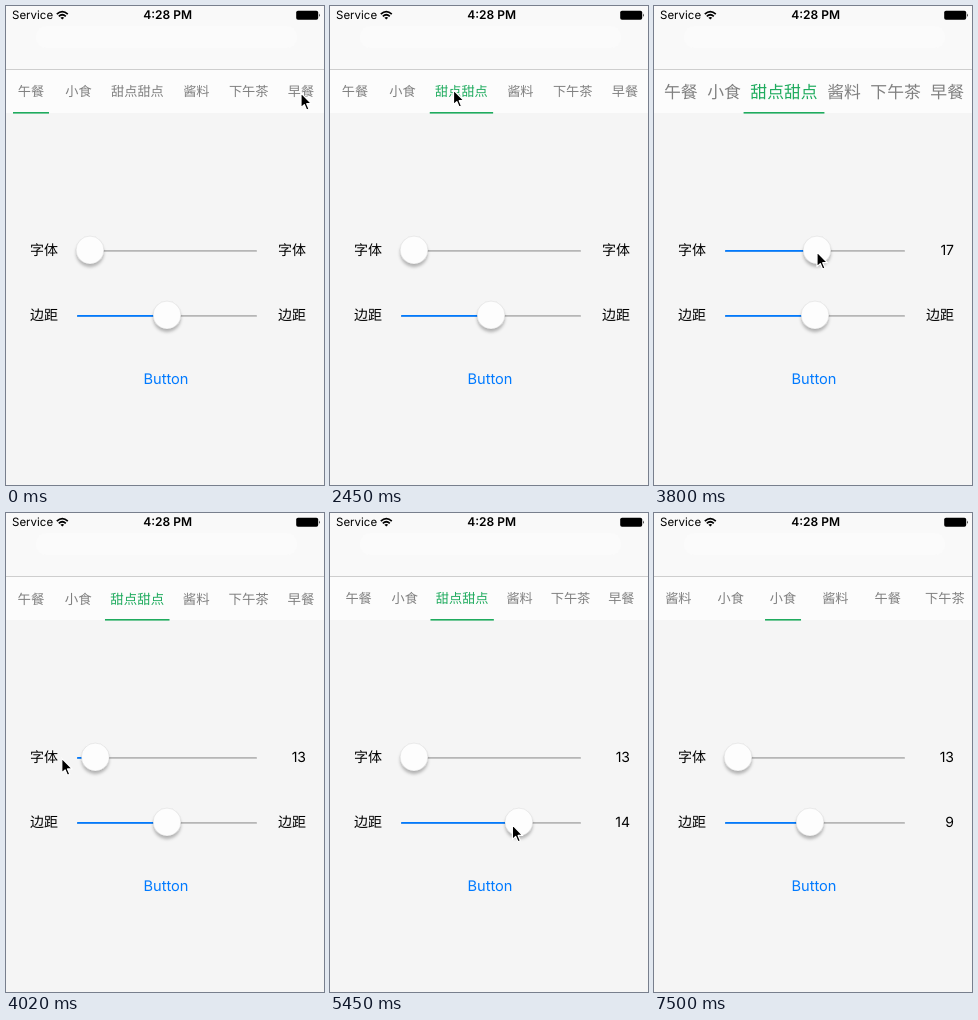
An HTML page that plays this animation: 318x479 px, repeating every 8490 ms.

```html
<!DOCTYPE html>
<html lang="zh-CN">
<head>
<meta charset="utf-8">
<title>Tab bar demo</title>
<style>
  html, body { margin: 0; width: 100%; height: 100%; overflow: hidden; background: #f5f5f5; }
  svg { display: block; width: 318px; height: 479px; }
  text { font-family: Inter, "Noto Sans CJK SC", "Noto Sans CJK", sans-serif; text-rendering: geometricPrecision; }
  .tab { font-family: "Noto Sans CJK SC", "Noto Sans CJK", sans-serif; fill: #808080; text-anchor: middle; }
  .chosen { fill: #1fab5e; }
  .label { font-size: 14px; }
  .value { text-anchor: end; }
</style>
</head>
<body>
<svg viewBox="0 0 318 479">
  <defs>
    <filter id="shade" x="-50%" y="-50%" width="200%" height="200%">
      <feDropShadow dx="0" dy="3.2" stdDeviation="1.8" flood-color="#000" flood-opacity=".26"/>
    </filter>
  </defs>
  <rect width="318" height="479" fill="#f5f5f5"/>
  <rect width="318" height="63" fill="#f9f9f9"/>
  <rect x="30" y="20" width="261" height="22" rx="10" fill="#fbfbfb"/>
  <rect y="64" width="318" height="43" fill="#fcfcfc"/>
  <rect y="63" width="318" height="1" fill="#cecece"/>

  <text x="6" y="13.3" font-size="11.5">Service</text>
  <g fill="none" stroke="#000" stroke-width="1.7">
    <path d="M50.8 8.2Q56.3 3.2 61.8 8.2"/>
    <path d="M52.8 10.3Q56.3 7.2 59.8 10.3"/>
  </g>
  <path d="M54.4 11.7Q56.3 10.2 58.2 11.7L56.3 13.6Z"/>
  <text x="161.7" y="13.3" font-size="12" font-weight="600" text-anchor="middle">4:28 PM</text>
  <rect x="290.2" y="4.7" width="22" height="9.1" rx="1.8"/>
  <path d="M313 7.5Q314.6 9.3 313 11.1Z"/>

  <g id="tabs"></g>
  <rect id="line" y="106" height="1.6" fill="#1fab5e"/>
  <g id="sliders"></g>
  <text id="button" x="160" y="378.3" font-size="14.6" text-anchor="middle" fill="#007aff">Button</text>
  <path id="pointer" d="M0 0V14.6L3.3 11.6L5.6 17L8 16L5.7 10.7H10.4Z" stroke="#fff" stroke-width="1.2" stroke-linejoin="round"/>
</svg>
<script>
const LOOP = 8490;
const LAG = 40;                       // the thumb trails the pointer (ms)
const THUMB_MIN = 84, THUMB_MAX = 238;
const PRESS = 6920, SWAP = 7040, LEAVE = 7490;

const MENU = ["午餐", "小食", "甜点甜点", "酱料", "下午茶", "早餐"];
const NEW_MENU = ["酱料", "小食", "小食", "酱料", "午餐", "下午茶"];
const TAPS = [{ at: 1240, tab: 5 }, { at: 2080, tab: 2 }];

// Pointer moves: start, end, x, y
const HOME = [295, 87];
const MOVES = [
  [280, 350, 291, 97], [520, 760, 292, 88],
  [1540, 2050, 123.5, 84],
  [2570, 2930, 84, 246], [2950, 3300, 163, 246], [3856, 4101, 20, 245],
  [4150, 4560, 159, 311], [4720, 5040, 191, 312], [5332, 5712, 154, 311],
  [6240, 6440, 158, 377], [7100, 7440, 166, 405]
];

const $ = id => document.getElementById(id);
const clamp = (v, low, high) => Math.max(low, Math.min(high, v));
const mix = (a, b, p) => a.map((v, i) => v + (b[i] - v) * p);

function progress(t, start, span) {
  const p = clamp((t - start) / span, 0, 1);
  return p * p * (3 - 2 * p);
}

function pointerAt(t) {
  return MOVES.reduce((pos, [start, end, ...to]) => mix(pos, to, progress(t, start, end - start)), HOME);
}

function set(el, attrs) {
  for (const k in attrs) el.setAttribute(k, attrs[k]);
}
function add(parent, tag, attrs, content = "") {
  const el = document.createElementNS("http://www.w3.org/2000/svg", tag);
  set(el, attrs);
  el.textContent = content;
  parent.append(el);
  return el;
}

// A slider is dragged by the pointer from grab to release
function makeSlider({ name, y, rest, grab, release, low, high }) {
  const box = $("sliders"), base = y + 5.2;
  const bar = { x: 71, y, height: 1.8, rx: .9 };
  add(box, "text", { class: "label", x: 24, y: base }, name);
  const label = add(box, "text", { class: "label value", x: 300, y: base });
  add(box, "rect", { ...bar, width: 180, fill: "#b6b6b6" });
  const fill = add(box, "rect", { ...bar, fill: "#007aff" });
  const thumb = add(box, "circle", {
    cy: y, r: 13.9, fill: "#fdfdfd", stroke: "#000", "stroke-opacity": .14, "stroke-width": .5, filter: "url(#shade)"
  });
  const offset = rest - pointerAt(grab)[0];

  return t => {
    const held = clamp(t - LAG, grab, release);
    const x = clamp(pointerAt(held)[0] + offset, THUMB_MIN, THUMB_MAX);
    const value = low + (x - THUMB_MIN) / (THUMB_MAX - THUMB_MIN) * (high - low);
    set(fill, { width: x - 71 });
    set(thumb, { cx: x });
    label.textContent = t > grab ? Math.round(value) : name;
    return value;
  };
}

const tabs = MENU.map(() => add($("tabs"), "text", { class: "tab" }));
const moveSize = makeSlider({ name: "字体", y: 244, rest: 84, grab: 2950, release: 4110, low: 13.2, high: 20.3 });
const moveMargin = makeSlider({ name: "边距", y: 309, rest: 161, grab: 4700, release: 5800, low: 0, high: 20 });

// Slots are at least 30 wide and spread evenly between the margins
function layout(menu, size, margin) {
  const widths = menu.map(word => Math.max(30, word.length * size));
  const used = widths.reduce((a, b) => a + b);
  const gap = (320 - 2 * margin - used) / (menu.length - 1);
  let x = margin;
  return widths.map(width => {
    const slot = [x + width / 2, width];
    x += width + gap;
    return slot;
  });
}

function draw(t) {
  const size = moveSize(t), margin = moveMargin(t);
  const swapped = t >= SWAP;
  const oldSlots = layout(MENU, size, margin);
  const newSlots = layout(NEW_MENU, size, margin);
  const menu = swapped ? NEW_MENU : MENU;
  const slots = swapped ? newSlots : oldSlots;
  const lastTap = TAPS.filter(tap => t >= tap.at).pop();
  const chosen = swapped || !lastTap ? -1 : lastTap.tab;

  tabs.forEach((tab, i) => {
    tab.textContent = menu[i];
    set(tab, {
      x: slots[i][0], y: 85.4 + .38 * size, "font-size": size,
      class: i === chosen ? "tab chosen" : "tab"
    });
  });

  let line = oldSlots[0];
  for (const { at, tab } of TAPS) line = mix(line, oldSlots[tab], progress(t, at, 300));
  line = mix(line, newSlots[2], progress(t, SWAP, 300));
  const [center, width] = line;
  set($("line"), { x: center - .6 * width, width: 1.2 * width });

  const [x, y] = pointerAt(t);
  set($("pointer"), { transform: `translate(${x} ${y})`, opacity: t < LEAVE ? 1 : 0 });
  set($("button"), { opacity: t >= PRESS && t < SWAP ? .3 : 1 });
}

const begin = performance.now();
function tick() {
  draw((performance.now() - begin) % LOOP);
  requestAnimationFrame(tick);
}
tick();
</script>
</body>
</html>
```
